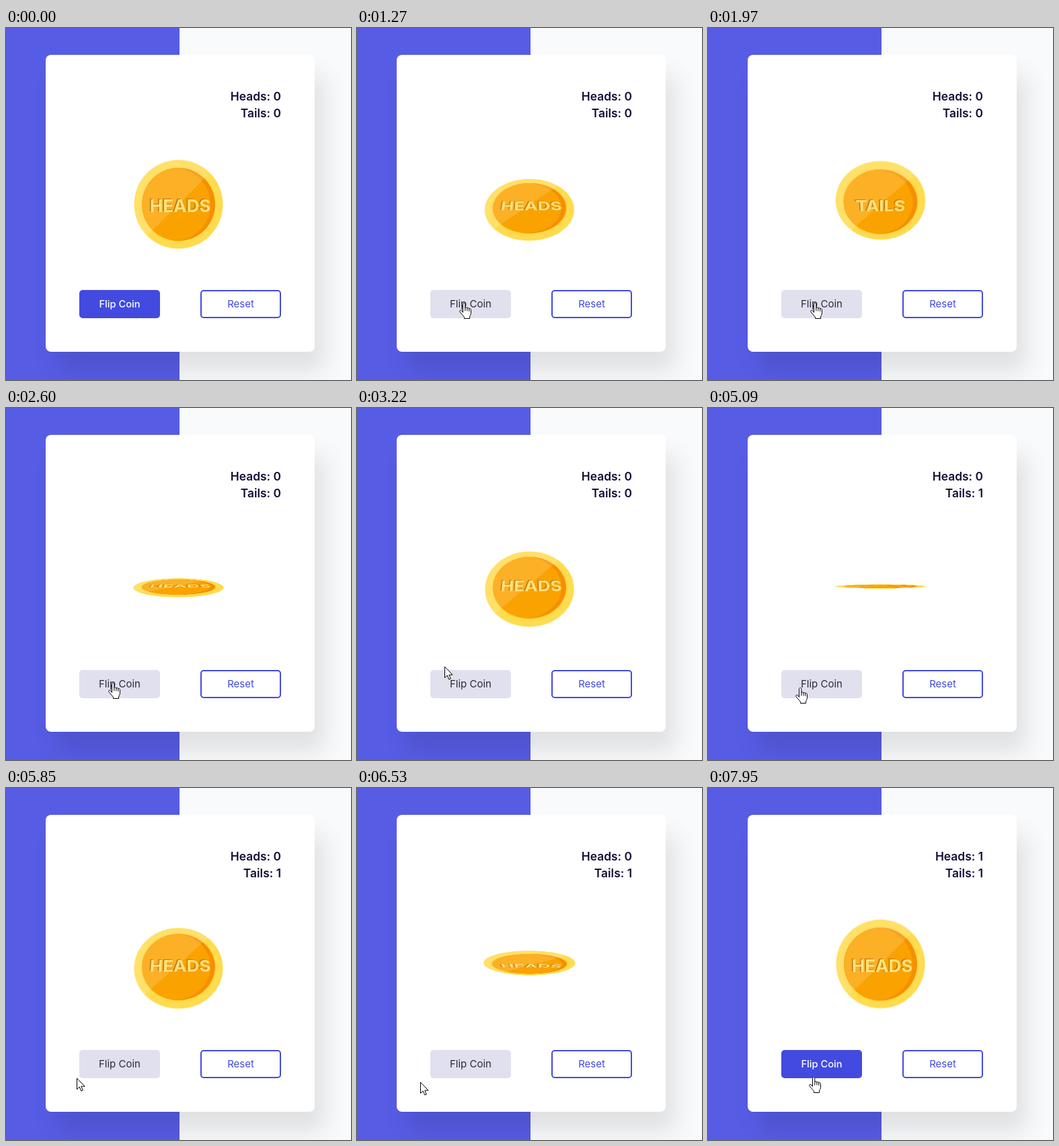
These frames come from a looping animation (513 px wide and 524 px high, 8000 ms). An HTML page:

```html
<!DOCTYPE html>
<html lang="en">
<head>
<meta charset="utf-8">
<title>Coin flip</title>
<style>
  * { box-sizing: border-box; }
  html, body { margin: 0; width: 100%; height: 100%; overflow: hidden; }
  body {
    position: relative;
    background: linear-gradient(90deg, #575ce5 258px, #f9fafc 258px);
    font-family: Inter, "Open Sans", sans-serif;
  }
  .card {
    position: absolute; left: 59px; top: 40px; width: 400px; height: 442px;
    border-radius: 8px; background: #fff; perspective: 300px;
    box-shadow: 15px 30px 35px rgba(0, 0, 0, .1);
  }
  .stats {
    position: absolute; right: 50px; top: 49px;
    font-size: 17.4px; font-weight: 600; line-height: 25px;
    text-align: right; color: #130f38;
  }
  .coin {
    position: absolute; left: 125px; top: 150px; width: 150px; height: 150px;
    transform-style: preserve-3d;
  }
  .face { position: absolute; inset: 0; backface-visibility: hidden; }
  .tails { transform: rotateX(180deg); }
  .face svg { position: absolute; left: 0; top: 0; }
  .face b {
    position: absolute; inset: 0; line-height: 150px; text-align: center;
    font-size: 26px; font-weight: 700; color: #ffe27a;
    text-shadow: -1.5px -1.5px 0 #b87416;
  }
  .tails b { left: -5px; }
  .button {
    position: absolute; top: 350px; width: 120px; height: 42px; border-radius: 5px;
    border: 2px solid #424ae0; color: #424ae0; background: #fff;
    font-size: 15px; line-height: 38px; text-align: center;
  }
  .flip { left: 50px; background: #424ae0; color: #fff; font-size: 14.7px; font-weight: 500; }
  .flip.off { background: #e1e0ee; border-color: #e1e0ee; color: #2b2938; font-size: 15px; font-weight: 400; }
  .reset { left: 230px; }
  .cursor { position: absolute; left: 0; top: 0; overflow: visible; }
  .cursor path { fill: #fff; stroke: #000; stroke-linejoin: round; stroke-linecap: round; }
</style>
</head>
<body>
<div class="card">
  <div class="stats"><div id="headCount"></div><div id="tailCount"></div></div>
  <div class="coin" id="coin">
    <div class="face heads">
      <svg width="150" height="150">
        <defs>
          <clipPath id="inner"><circle cx="72.5" cy="72.5" r="54.5"/></clipPath>
          <clipPath id="outer"><circle cx="72.5" cy="72.5" r="66"/></clipPath>
          <g id="disc">
            <circle cx="72.5" cy="72.5" r="66" fill="#ffdb4d"/>
            <circle cx="72.5" cy="72.5" r="54.5" fill="#f68f00"/>
            <circle cx="65.5" cy="72.5" r="54.5" fill="#faa200" clip-path="url(#inner)"/>
            <path d="M0 0H145L0 145Z" fill="#fff" opacity=".15" clip-path="url(#outer)"/>
          </g>
        </defs>
        <use href="#disc"/>
      </svg>
      <b>HEADS</b>
    </div>
    <div class="face tails">
      <svg width="150" height="150"><use href="#disc"/></svg>
      <b>TAILS</b>
    </div>
  </div>
  <div class="button flip" id="flip">Flip Coin</div>
  <div class="button reset">Reset</div>
</div>
<svg class="cursor" id="cursor" width="20" height="26">
  <path id="arrow" d="M.5 .5V16.5L4.2 13L6.8 19L9.3 18L6.8 12.2H11.7Z"/>
  <g id="hand" transform="translate(-6 0)">
    <path d="M5.5 14V2.2C5.5 0 8.8 0 8.8 2.2V7.8C9 6.4 11.8 6.5 11.9 8.3C12.3 7 14.7 7.3 14.8 9.2C15.3 8.2 17.5 8.5 17.5 10.6V15.5C17.5 18 15.8 19 15.6 21V23.5H7.5V21.5C6 19 3.4 17 1 13.6C-.2 11.6 2 10.4 3.5 11.8Z"/>
    <path d="M8.8 7.8V12M11.9 8.3V12M14.8 9.2V12.5"/>
  </g>
</svg>
<script>
  const LOOP = 8000, STEP = 69.3, STEP_OFFSET = 50;
  const CLICK_LEAD = 100, COUNT_DELAY = 3000;
  const $ = id => document.getElementById(id);

  const flips = [
    { start: 1164, length: 3085, turn: 1980 },
    { start: 4915, length: 3160, turn: 2160 }
  ];

  const entry = { x: 166, y: 530 };
  const moves = [
    { start: 460, length: 280, x: 158, y: 409 },
    { start: 3115, length: 280, x: 78, y: 342 },
    { start: 3950, length: 750, x: 136, y: 416 },
    { start: 5600, length: 390, x: 94, y: 438 },
    { start: 7550, length: 380, x: 156, y: 430 }
  ];

  const progress = (part, t) => Math.min(1, Math.max(0, (t - part.start) / part.length));

  // cubic-bezier(.25, .1, .25, 1), solved for its parameter by bisection
  function ease(x) {
    let s = .5;
    for (let half = .25; half > 1e-7; half /= 2) {
      s += .75 * s * (1 - s) + s ** 3 < x ? half : -half;
    }
    const r = 1 - s;
    return .3 * s * r * r + 3 * s * s * r + s ** 3;
  }

  function pointerAt(t) {
    return moves.reduce((from, move) => {
      const u = progress(move, t), k = u * u * (3 - 2 * u);
      return { x: from.x + (move.x - from.x) * k, y: from.y + (move.y - from.y) * k };
    }, entry);
  }

  function draw(ms) {
    // The scene is held between even steps.
    const t = Math.floor((ms + STEP_OFFSET) / STEP) * STEP - STEP_OFFSET + 20;
    const flip = flips.filter(f => t >= f.start - CLICK_LEAD).pop();
    const angle = flip ? flip.turn * ease(progress(flip, t)) : 0;
    const [tailDone, headDone] = flips.map(f => t >= f.start + COUNT_DELAY);

    $("coin").style.transform = `rotateX(${angle}deg)`;
    $("headCount").textContent = `Heads: ${+headDone}`;
    $("tailCount").textContent = `Tails: ${+tailDone}`;
    $("flip").classList.toggle("off", !!flip && t < flip.start + COUNT_DELAY);

    const { x, y } = pointerAt(t);
    const onButton = x >= 109 && x < 229 && y >= 390 && y < 432;
    $("cursor").style.transform = `translate(${Math.round(x)}px, ${Math.round(y)}px)`;
    $("hand").style.display = onButton ? "inline" : "none";
    $("arrow").style.display = onButton ? "none" : "inline";
  }

  const begin = performance.now();
  function loop() {
    draw((performance.now() - begin) % LOOP);
    requestAnimationFrame(loop);
  }
  loop();
</script>
</body>
</html>
```
